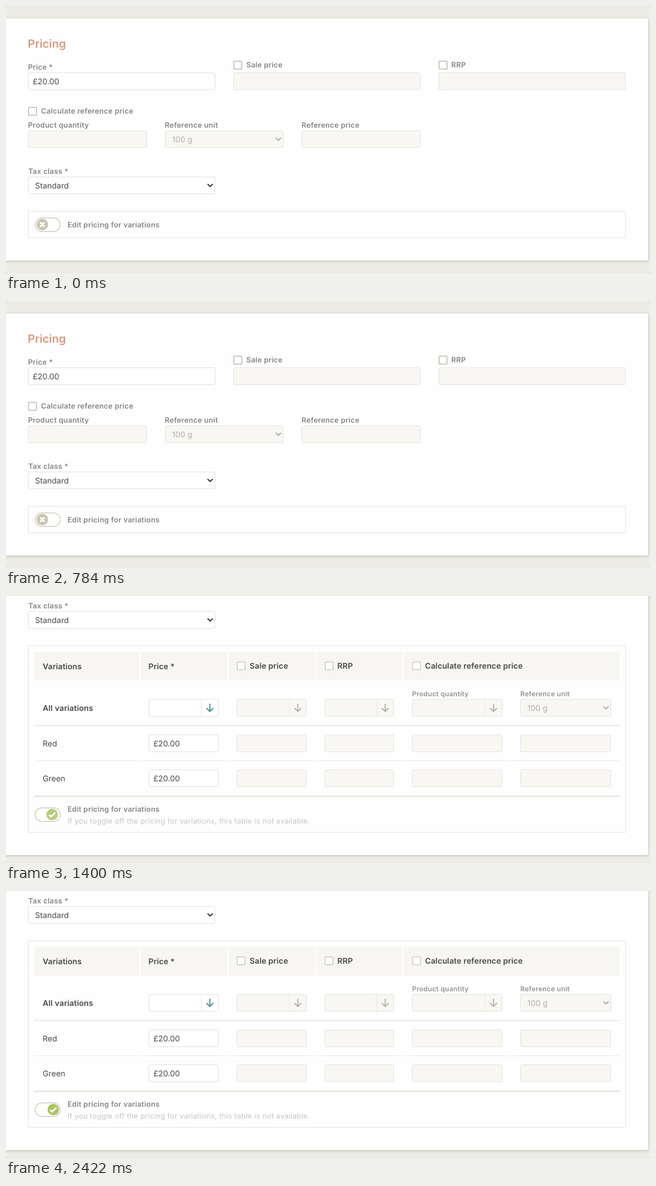
Write an HTML page that moves like this. It is 1142 by 474 pixels and loops after 3010 ms.

```html
<!DOCTYPE html>
<html lang="en">
<head>
<meta charset="utf-8">
<title>Pricing form</title>
<style>
  html, body { margin: 0; width: 100%; height: 100%; overflow: hidden; background: #8b8b87; }
  svg { display: block; width: 1142px; height: 474px; border-radius: 2px; background: #ecebe4; }
  text { font-family: Inter, "Open Sans", sans-serif; font-size: 14px; fill: #484848; text-rendering: geometricPrecision; }
  .title { font-size: 20px; font-weight: 600; fill: #d89a80; }
  .label { font-size: 13px; font-weight: 600; letter-spacing: .22px; fill: #878787; }
  .small { font-size: 12px; font-weight: 600; letter-spacing: .25px; fill: #949494; }
  .head { font-weight: 600; letter-spacing: .12px; }
  .note { font-size: 13px; letter-spacing: .24px; fill: #c6c6c6; }
  .muted { fill: #aeada6; }
  .card { fill: #fefefe; filter: drop-shadow(0 1px 2px rgba(90, 88, 75, .35)); }
  .box { fill: #fff; stroke: #e0e0dd; }
  .off { fill: #f8f7f3; stroke: #e4e2da; }
  .frame { fill: none; stroke: #e3e3e1; }
  .check { fill: #fff; stroke: #cbc9be; stroke-width: 2; }
  .check.thin { stroke-width: 1.5; }
  .line { fill: none; stroke-linecap: round; stroke-linejoin: round; stroke-width: 2; }
  .cell { fill: #f7f6f2; }
  .rule { fill: #e9e8e1; }
  .pill { fill: #fff; stroke: #cfccbd; stroke-width: 1.5; }
  .mark { fill: none; stroke: #fff; }
  .cross { stroke-width: 3; }
  .tick { stroke-width: 2.8; }

  .before, .after, .knob, .disc, .cross, .tick { animation: 3010ms step-end infinite; }
  .before { animation-name: leave; }
  .after { animation-name: enter; }
  .knob { animation-name: slide; }
  .disc { animation-name: tint; }
  .cross { animation-name: uncross; }
  .tick { animation-name: confirm; }

  @keyframes leave { 0% { visibility: visible } 41.8605%, 100% { visibility: hidden } }
  @keyframes enter { 0% { visibility: hidden } 41.8605%, 100% { visibility: visible } }
  @keyframes uncross { 0% { visibility: visible } 44.186%, 100% { visibility: hidden } }
  @keyframes confirm { 0% { visibility: hidden } 44.186%, 100% { visibility: visible } }
  @keyframes slide {
    0% { transform: translate(64.5px, 388px) }
    41.8605% { transform: translate(66.5px, 388px) }
    44.186% { transform: translate(77px, 388px) }
    46.5116% { transform: translate(81.7px, 388px) }
    48.8372% { transform: translate(83.4px, 388px) }
    51.1628%, 100% { transform: translate(83.8px, 388px) }
  }
  @keyframes tint {
    0% { fill: #c8c5b1 }
    41.8605% { fill: #d0cdba }
    44.186% { fill: #cbd19d }
    46.5116% { fill: #b7cb7c }
    48.8372% { fill: #aec668 }
    51.1628%, 100% { fill: #abc564 }
  }
</style>
</head>
<body>
<svg id="stage" viewBox="0 0 1142 474"></svg>
<script>
  const text = (x, y, value, kind = '') => `<text x="${x}" y="${y}" class="${kind}">${value}</text>`;
  const rect = (x, y, w, h, kind, r = 0) =>
    `<rect x="${x}" y="${y}" width="${w}" height="${h}" rx="${r}" class="${kind}"/>`;
  const line = (d, color) => `<path d="${d}" class="line" stroke="${color}"/>`;

  // Outlined shapes take their outer left, top, right and bottom edges.
  const outline = (left, top, right, bottom, kind, r = 0) =>
    rect(left + .5, top + .5, right - left - 1, bottom - top - 1, kind, r);
  const field = (left, right, top, kind = 'off') => outline(left, top, right, top + 31, kind, 2.5);
  const checkbox = (x, y, thin = '') => rect(x + 1, y + 1, 14, 14, 'check ' + thin, 1);
  const chevron = (x, y, color) => line(`M${x - 4} ${y - 2}l4 4l4 -4`, color);

  const select = (left, right, top, value, active) =>
    field(left, right, top, active ? 'box' : 'off') +
    text(left + 12.5, top + 21, value, active ? '' : 'muted') +
    chevron(right - 9, top + 15.5, active ? '#333' : '#aaa9a2');

  const fillField = (left, right, active) =>
    field(left, right, 183, active ? 'box' : 'off') +
    rect(right - 31, 184, 1, 29, 'rule') +
    line(`M${right - 15.5} 192v13m-5.5 -5.5l5.5 5.5l5.5 -5.5`, active ? '#4d918c' : '#b3b2a9');

  const taxClass = top =>
    text(39.5, top - 5, 'Tax class *', 'label') + select(39, 371, top, 'Standard', true);

  const simpleForm =
    rect(-10, 22, 1149, 430, 'card', 4) +
    text(38.5, 74, 'Pricing', 'title') +
    text(39, 113, 'Price *', 'label') +
    field(39, 371, 118, 'box') + text(47.5, 139, '£20.00') +
    checkbox(403, 97) + text(426, 109, 'Sale price', 'label') + field(403, 735, 118) +
    checkbox(767, 97) + text(789.5, 109, 'RRP', 'label') + field(767, 1099, 118) +
    checkbox(39, 179) + text(62, 191, 'Calculate reference price', 'label') +
    text(39, 216, 'Product quantity', 'label') + field(39, 250, 221) +
    text(281.5, 216, 'Reference unit', 'label') + select(282, 492, 221, '100 g') +
    text(524, 216, 'Reference price', 'label') + field(524, 735, 221) +
    taxClass(303) +
    outline(39, 364, 1099, 412, 'frame') +
    text(109, 393, 'Edit pricing for variations', 'label');

  const columns = [[50, 236], [238, 392], [394, 548], [550, 703], [705, 1088]];
  const inputs = [[409, 533], [565, 688], [720, 880], [912, 1073]];

  const variationRow = (name, top) =>
    text(65, top + 21, name) +
    field(253, 377, top, 'box') + text(261.5, top + 21, '£20.00') +
    inputs.map(([left, right]) => field(left, right, top)).join('');

  const variationTable =
    rect(-10, -20, 1149, 480, 'card', 4) +
    taxClass(27) +
    outline(39, 88, 1099, 420, 'frame') +
    columns.map(([left, right]) =>
      rect(left, 99, right - left, 51, 'cell') + rect(left, 292, right - left, 1, 'rule')).join('') +
    rect(895, 292, 2, 1, 'card') +
    text(65, 130, 'Variations', 'head') +
    text(252.5, 130, 'Price *', 'head') +
    checkbox(409, 116, 'thin') + text(432, 129, 'Sale price', 'head') +
    checkbox(565, 116, 'thin') + text(587.5, 129, 'RRP', 'head') +
    checkbox(720, 116, 'thin') + text(743, 129, 'Calculate reference price', 'head') +
    text(65, 204, 'All variations', 'head') +
    fillField(253, 377, true) +
    inputs.slice(0, 3).map(([left, right]) => fillField(left, right)).join('') +
    text(720, 178, 'Product quantity', 'small') +
    text(912, 178, 'Reference unit', 'small') + select(912, 1073, 183, '100 g') +
    rect(50, 229, 1038, 2, 'rule') +
    variationRow('Red', 246) +
    variationRow('Green', 308) +
    rect(50, 354, 1038, 3, 'rule') +
    text(109, 383, 'Edit pricing for variations', 'label') +
    text(109, 404, 'If you toggle off the pricing for variations, this table is not available.', 'note');

  const toggle =
    rect(51.75, 376.25, 44.5, 24, 'pill', 12) +
    `<g class="knob">
      <circle r="10.2" class="disc"/>
      <path d="M-4 -4L4 4M4 -4L-4 4" class="mark cross"/>
      <path d="M-5.5 .5l3.5 3.5l7.5 -7.5" class="mark tick"/>
    </g>`;

  document.getElementById('stage').innerHTML =
    `<g class="before">${simpleForm}</g><g class="after">${variationTable}</g>${toggle}`;
</script>
</body>
</html>
```
